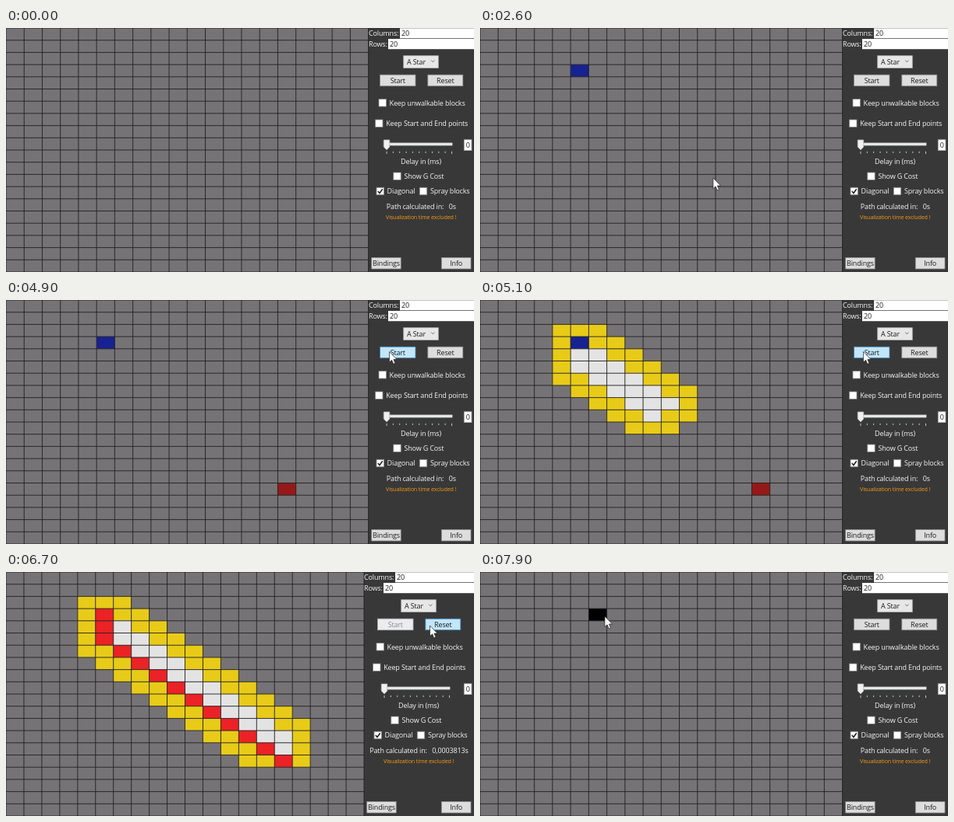
These frames come from a looping animation (600x314 px, 8 s). An HTML page:

```html
<!DOCTYPE html>
<html lang="en">
<head>
<meta charset="utf-8">
<title>Pathfinding grid</title>
<style>
html, body { margin: 0; width: 100%; height: 100%; overflow: hidden; background: #383838; }
svg { display: block; width: 100%; height: 100%; }
text { font: 9px "Open Sans", "Noto Sans", sans-serif; letter-spacing: -.15px; fill: #f6f6f6; }
.dark { fill: #1c1c1c; }
.note { font-size: 7.2px; fill: #f29a16; }
.mid { text-anchor: middle; }
</style>
</head>
<body>
<svg id="stage" viewBox="0 0 600 314"></svg>
<script>
const N = 20, W = 600, H = 314, LOOP = 8000, STEP = 100;
const START = [5, 3], GOAL = [15, 15];
const COLOR = {
  open: '#e8cb18', closed: '#e4e3e4', path: '#eb2226',
  start: '#172291', goal: '#951918', wall: '#000'
};
const stage = document.getElementById('stage');

function add(parent, tag, attrs, text) {
  const el = document.createElementNS('http://www.w3.org/2000/svg', tag);
  set(el, attrs);
  if (text) el.textContent = text;
  parent.appendChild(el);
  return el;
}
function set(el, attrs) {
  for (const k in attrs) el.setAttribute(k, attrs[k]);
}
const group = () => add(stage, 'g', {});
const label = (g, x, y, text, cls = '') => add(g, 'text', { x, y, class: cls }, text);
const box = (g, x, y, width, height, fill, stroke = 'none') =>
  add(g, 'rect', { x, y, width, height, fill, stroke, 'stroke-width': .8 });

// Grid
add(stage, 'rect', { width: W, height: H, fill: '#383838' });
const field = add(stage, 'rect', { width: 464.6, height: H, fill: '#757375' });
const cells = [];
const cellLayer = group();
for (let r = 0; r < N; r++)
  for (let c = 0; c < N; c++) cells.push(add(cellLayer, 'rect', { fill: 'none' }));
const lines = add(stage, 'path', { fill: 'none', stroke: '#222122', 'stroke-width': .9 });

// Panel: items tied to its left edge, its middle or the right edge of the stage
const left = group(), mid = group(), right = group();

function button(g, x, y, w, text) {
  const rect = box(g, x, y, w, 14.5, '#dddddd', '#8a8a8a');
  const cap = label(g, x + w / 2, y + 10.6, text, 'mid dark');
  return { rect, cap };
}
function check(x, y, text, on) {
  box(mid, x, y, 9.4, 9.4, '#fff', '#8a8a8a');
  if (on) add(mid, 'path', {
    d: `M${x + 1.8} ${y + 4.7}l2.2 2.5 3.7-5.2`, fill: 'none', stroke: '#1c1c1c', 'stroke-width': 1.5
  });
  label(mid, x + 13.6, y + 8, text);
}

label(left, 465, 9.8, 'Columns:');
box(left, 505, .3, 110, 13, '#fff');
label(left, 507, 9.8, '20', 'dark');
label(left, 465, 23.5, 'Rows:');
box(left, 490, 14, 120, 13.2, '#fff');
label(left, 492, 23.5, '20', 'dark');
button(left, 468.7, 295.5, 37.5, 'Bindings');

box(mid, 509.7, 35.7, 44.6, 15.8, '#e7e7e7', '#acacac');
label(mid, 514, 47, 'A Star', 'dark');
add(mid, 'path', { d: 'M545.2 41.6l2.1 2.2 2.1-2.2', fill: 'none', stroke: '#606060', 'stroke-width': .9 });
const startBtn = button(mid, 479.5, 60.2, 45.5, 'Start');
const resetBtn = button(mid, 540.8, 60.2, 45, 'Reset');

check(478, 91.6, 'Keep unwalkable blocks');
check(473.6, 118, 'Keep Start and End points');

box(mid, 486, 148, 86, 3, '#e7eaea', '#d6d6d6');
let ticks = '';
for (let i = 0; i <= 10; i++) ticks += `M${488 + i * 8.35} 158.8v${i % 10 ? 2.2 : 3.2}`;
add(mid, 'path', { d: ticks, stroke: '#e5e5e5', 'stroke-width': .8 });
add(mid, 'path', { d: 'M484.2 144h7.6v9l-3.8 4-3.8-4z', fill: '#f0f0f0', stroke: '#acacac', 'stroke-width': .7 });
label(mid, 532, 175, 'Delay in (ms)', 'mid');

check(496.8, 186, 'Show G Cost');
check(475, 205.3, 'Diagonal', true);
check(530.3, 205.3, 'Spray blocks');
const timing = label(mid, 532.4, 233, '', 'mid');
timing.style.whiteSpace = 'pre';
label(mid, 532.2, 246.2, 'Visualization time excluded !', 'mid note');

box(right, 587.3, 143.8, 9.6, 13.8, '#fff', '#acacac');
label(right, 592.2, 154, '0', 'mid dark');
button(right, 558.3, 295.5, 37.7, 'Info');

const cursor = add(stage, 'path', {
  d: 'M0 0V13.6L3.1 10.8 5.2 15.8 7.4 14.8 5.4 10H9.6Z',
  fill: '#fff', stroke: '#222', 'stroke-width': .7
});

// Search result
const key = (c, r) => r * N + c;
const path = [], closed = [];
for (let r = START[1]; r <= GOAL[1]; r++) {
  const c = Math.max(START[0], r);
  path.push([c, r]);
  if (r < GOAL[1]) closed.push([c, r]);
  if (r > START[1] && r < GOAL[1])
    for (let x = c + 1; x <= Math.min(r + 2, GOAL[0]); x++) closed.push([x, r]);
}

const clamp = x => Math.max(0, Math.min(1, x));
const ease = x => x * x * (3 - 2 * x);
// time, x, y of the pointer
const TRACK = [
  [1900, 133, 56], [2000, 133, 56], [2900, 357, 241], [3700, 357, 241],
  [4600, 491.5, 66.5], [6200, 491.5, 66.5], [6600, 543.5, 69],
  [7100, 543.5, 69], [7700, 136, 57], [7900, 160, 57]
];
function pointer(t) {
  let i = 0;
  while (i < TRACK.length - 2 && t >= TRACK[i + 1][0]) i++;
  const a = TRACK[i], b = TRACK[i + 1], k = ease(clamp((t - a[0]) / (b[0] - a[0])));
  return [a[1] + (b[1] - a[1]) * k, a[2] + (b[2] - a[2]) * k];
}

function mix(a, b, k) {
  return 'rgb(' + a.map((v, i) => Math.round(v + (b[i] - v) * k)) + ')';
}
function paint(btn, hover, disabled) {
  set(btn.rect, {
    fill: disabled ? '#ececee' : mix([221, 221, 221], [194, 230, 252], hover),
    stroke: disabled ? '#adb2b5' : mix([138, 138, 138], [60, 127, 177], hover)
  });
  btn.cap.style.fill = disabled ? '#8a8a8a' : '#1c1c1c';
}

function colors(t) {
  const map = {};
  const put = (p, color) => { map[key(...p)] = color; };
  if (t >= 7000) {
    if (t >= 7900) put([6, 3], COLOR.wall);
    return map;
  }
  if (t >= 5100) {
    const seen = closed.slice(0, Math.ceil(closed.length * clamp((t - 5000) / 200)));
    for (const [c, r] of seen)
      for (let y = r - 1; y <= r + 1; y++)
        for (let x = c - 1; x <= c + 1; x++) put([x, y], COLOR.open);
    for (const p of seen) put(p, COLOR.closed);
  }
  if (t >= 1800) put(START, COLOR.start);
  if (t >= 3500) put(GOAL, COLOR.goal);
  if (t >= 5200) for (const p of path) put(p, COLOR.path);
  return map;
}

function render(t) {
  const solved = t >= 5200 && t < 7000;
  const width = solved ? 459 : 464.6, cw = width / N, ch = H / N;
  const map = colors(t);
  set(field, { width });
  cells.forEach((el, i) => {
    set(el, map[i]
      ? { x: i % N * cw, y: Math.floor(i / N) * ch, width: cw, height: ch, fill: map[i] }
      : { fill: 'none' });
  });
  let d = '';
  for (let i = 0; i <= N; i++) d += `M${i * cw} 0V${H}M0 ${i * ch}H${width}`;
  set(lines, { d });

  set(left, { transform: `translate(${solved ? -6 : 0})` });
  set(mid, { transform: `translate(${solved ? -3 : 0})` });
  timing.textContent = 'Path calculated in:   ' + (solved ? '0,0003813s' : '0s');

  paint(startBtn, t < 5200 ? clamp((t - 4600) / 300) : 0, solved);
  paint(resetBtn, clamp((t - 6400) / 300) * clamp((7400 - t) / 200), false);

  const [x, y] = pointer(t);
  set(cursor, { transform: `translate(${x} ${y})`, visibility: t < 1900 ? 'hidden' : 'visible' });
}

let last = -1;
function tick(now) {
  const t = Math.floor(now % LOOP / STEP) * STEP;
  if (t !== last) render(last = t);
  requestAnimationFrame(tick);
}
render(0);
requestAnimationFrame(tick);
</script>
</body>
</html>
```
